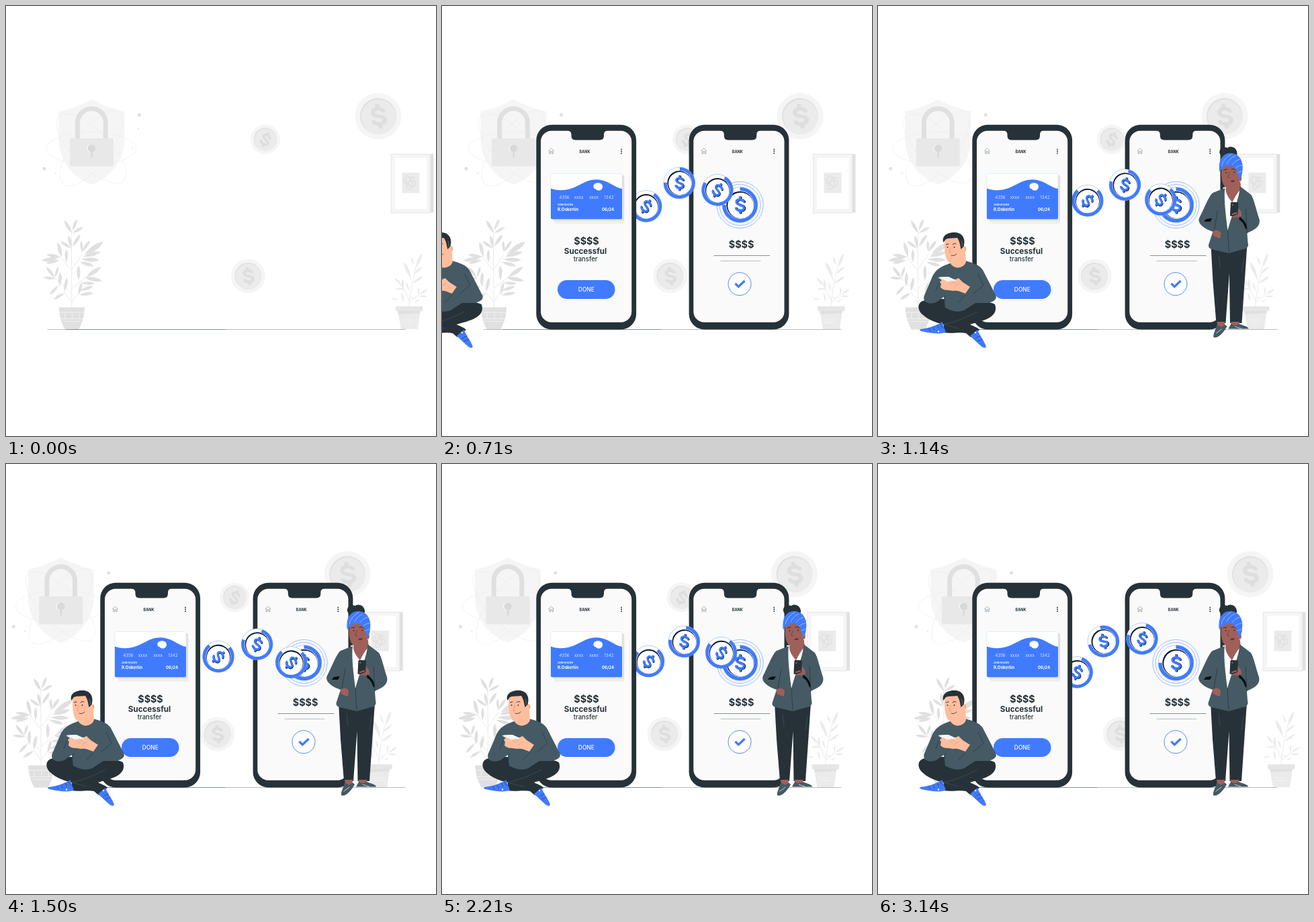
An HTML page that plays this animation: 640 by 640 pixels, repeating every 3.21 s.

```html
<!DOCTYPE html>
<html lang="en">
<head>
<meta charset="utf-8">
<title>Money transfer</title>
<style>
  html, body { margin: 0; width: 100%; height: 100%; overflow: hidden; background: #fff; }
  svg { display: block; width: 100vw; height: 100vh; }
  text { font-family: Inter, Lato, sans-serif; }
  .line { fill: none; stroke-linecap: round; stroke-linejoin: round; }
  .butt { fill: none; }
</style>
</head>
<body>
<svg id="stage" viewBox="0 0 640 640" xmlns="http://www.w3.org/2000/svg"></svg>
<script>
const BLUE = '#407bff', DARK = '#263238', SLATE = '#455a64';
const PALE = '#f5f5f5', LIGHT = '#ebebeb', GREY = '#e0e0e0';
const PEACH = '#ffbe9d', BROWN = '#9f605a';
const LOOP = 3210, STEPS = 45;

const path = (d, fill) => `<path d="${d}" fill="${fill}"/>`;
const line = (d, color, width = 1, cap = 'line') =>
  `<path class="${cap}" d="${d}" stroke="${color}" stroke-width="${width}"/>`;
const circle = (x, y, r, fill, extra = '') => `<circle cx="${x}" cy="${y}" r="${r}" fill="${fill}" ${extra}/>`;
const rect = (x, y, w, h, fill, r = 0, extra = '') =>
  `<rect x="${x}" y="${y}" width="${w}" height="${h}" rx="${r}" fill="${fill}" ${extra}/>`;
const group = (body, transform = '', id = '') => `<g id="${id}" transform="${transform}">${body}</g>`;
const label = (s, x, y, size, weight, fill = DARK, anchor = 'middle') =>
  `<text x="${x}" y="${y}" font-size="${size}" font-weight="${weight}" text-anchor="${anchor}" fill="${fill}">${s}</text>`;

// Dollar sign about 26 units high, centred on the origin
const DOLLAR = 'M5.6-5C3.5-9-5.4-9.4-5.4-4.3C-5.4 1 5.8-1 5.8 4.4C5.8 9.6-4 9.2-6 5M0-11.5V-8M0 8V11.5';
const dollar = (color, shade) =>
  group(line(DOLLAR, shade, 3.4), 'translate(1.3 .5)') + line(DOLLAR, color, 3.4);

function leaf([x1, y1, x2, y2], fill, bulge) {
  const dx = x2 - x1, dy = y2 - y1, nx = -dy * bulge, ny = dx * bulge;
  const mx = x1 + dx * .6, my = y1 + dy * .6;
  return path(`M${x1} ${y1}Q${mx + nx} ${my + ny} ${x2} ${y2}Q${mx - nx} ${my - ny} ${x1} ${y1}Z`, fill);
}

// "x y x y" pairs of base and tip
const leaves = (list, fill, bulge) =>
  list.split(',').map(s => leaf(s.trim().split(' ').map(Number), fill, bulge)).join('');

function greyCoin(x, y, r, turn) {
  return circle(x, y, r, PALE) + circle(x, y, r * .78, GREY) +
    circle(x + r * .02, y + r * .035, r * .75, LIGHT) +
    group(dollar('#dedede', GREY), `translate(${x} ${y}) rotate(${turn}) scale(${r / 24.5})`);
}

function blueCoin(x, y, scale, turn) {
  return group(
    circle(0, 0, 26.3, '#fff', `stroke="${BLUE}" stroke-width=".4"`) +
    line('M0-23.6A23.6 23.6 0 1 1-23.6 0', BLUE, 5.4, 'butt') +
    circle(0, 0, 20.2, '#0c1a33') + circle(1, .9, 19.2, '#fff') +
    dollar(BLUE, '#15264d'),
    `translate(${x} ${y}) rotate(${turn}) scale(${scale})`);
}

function shield() {
  const orbit = (rx, ry, turn) =>
    `<ellipse cx="127" cy="212" rx="${rx}" ry="${ry}" transform="rotate(${turn} 127 212)" fill="none" stroke="${LIGHT}" stroke-width=".6"/>`;
  return path('M127.5 139Q149 151 176.5 157V199C176 231 153 257 127.5 266C102 257 79 231 78.5 199V157Q106 151 127.5 139Z', PALE) +
    orbit(67, 24, 0) + orbit(68, 27, 45) + orbit(68, 27, -52) +
    line('M106.7 197V173.5a20.800 20.800 0 0 1 41.6 0V197', GREY, 7, 'butt') +
    rect(95, 197, 65, 41.5, '#e8e8e8', 2) +
    circle(126, 212, 6, PALE) + circle(127.5, 212, 5.7, '#d9d9d9') + rect(126.4, 214, 2.4, 12, '#d9d9d9', 1) +
    circle(198.5, 162, 2.5, GREY) + circle(57, 242, 2.5, GREY) +
    circle(197, 182.5, .9, GREY) + circle(74, 249, .9, GREY) + circle(188, 212, .9, GREY);
}

function picture() {
  return rect(631, 220.5, 5.5, 87, GREY) +
    rect(573.3, 220.5, 58.5, 87.5, PALE, 0, 'stroke="#e6e6e6"') +
    rect(579, 226, 47.5, 76, '#fff') + rect(589.5, 248, 26, 30.5, LIGHT) +
    line('M592 256C591 265 599 268 601 260C603 252 594 250 595 258C597 268 606 272 609 266C613 258 601 258 597 266C593 276 604 274 605 266C606 256 598 252 608 256', GREY, 1.5);
}

function largePlant() {
  return line('M98 449L97.5 335M98 395L82 374M98 392L113 370M98 420L119 404M98 441L110 424M98 427L73 405M98 441L87 426', LIGHT, 1) +
    leaves(`98 338 87 319,99 334 106 317,99 338 115 329,97 360 93 341,99 358 111 340,97 361 81 350,
      83 374 77 351,82 374 60 370,78 375 53 379,80 378 60 383,90 382 90 362,113 366 112 349,
      113 366 125 349,117 370 145 351,115 373 141 366,112 377 139 378,110 381 131 387,108 409 108 386,
      119 404 142 388,117 404 143 409,112 412 132 413,110 424 130 417,109 430 130 427,108 430 113 411,
      73 405 60 388,73 404 78 388,74 406 56 404,80 418 81 396,87 425 91 404,78 416 65 430,87 427 71 437`, GREY, .23) +
    path('M79 448.5H117C117 461 113 473 108 481.5H88C83 473 79 461 79 448.5Z', GREY) +
    line('M80 456H116M82 465.5H114M85 469.5H111M88 457V465M99 457V465M109 457V465', PALE, .8);
}

function smallPlant() {
  return line('M600 447Q602 415 613 378M601 440L590 417M602 440L614 430M603 408L595 390', LIGHT, 1) +
    leaves(`611 388 619 368,607 386 603 373,603 405 592 381,607 399 620 388,605 413 621 402,590 417 578 404,
      591 424 590 406,592 421 579 421,600 424 596 411,592 440 589 427,584 436 573 436,614 430 614 418,
      615 430 628 421,614 432 627 432,608 441 616 437,608 437 602 432`, LIGHT, .19) +
    path('M583 453H617L613 481H588Z', LIGHT) + path('M583 453.5H617L616 457L584 459Z', GREY) +
    rect(580, 447, 40.5, 7, '#e6e6e6', 1) + line('M590 467H607M591 471H606', PALE, .7);
}

function phoneBody() {
  return rect(140.3, 176.7, 148.8, 304.8, DARK, 23) + rect(147, 185.7, 135.2, 285, '#fafafa', 16) +
    path('M186 185H247Q241 186 241 191V193Q241 199.5 234.5 199.5H198.5Q192.5 199.5 192.5 193V191Q192.5 186 186 185Z', DARK) +
    label('BANK', 212.5, 219, 5.5, 700) +
    line('M158.8 215.5L162.5 211.8L166.3 215.5M159.8 215V219.8H161.5V216.5H163.7V219.8H165.4V215', '#78858b', .6) +
    [213.4, 216.3, 219.2].map(y => circle(267, y, .95, DARK)).join('');
}

function card() {
  const digits = [['4356', 182], ['xxxx', 203.5], ['xxxx', 226], ['1342', 248.5]];
  return rect(167, 254, 104.5, 70, '#efefef', 2) + rect(165, 252, 106, 67.5, GREY, 2) +
    rect(162, 249.5, 106, 67.8, '#fff', 2, 'stroke="#d7e2fb" stroke-width=".6"') +
    path('M162 271.5C174 276 188 275 203 267C219 258 231 255 246 262C256 267 261 271 268 272V315.3Q268 317.3 266 317.3H164Q162 317.3 162 315.3Z', BLUE) +
    path('M225.5 267C227 262 238 262 239 268C239.5 275.5 231 276 229 272.5C226 272 225 270 225.5 267Z', '#fff') +
    digits.map(([s, x]) => label(s, x, 287, 6.4, 300, '#fff')).join('') +
    label('CARD HOLDER', 172, 297, 3.2, 700, '#fff', 'start') +
    label('R.Oskerlin', 172, 305.2, 6.2, 700, '#fff', 'start') +
    label('06/24', 256, 305.2, 6, 700, '#fff', 'end');
}

function senderPhone() {
  return phoneBody() + card() + label('$$$$', 215, 354.5, 14.3, 700) +
    label('Successful', 213.5, 369, 11.6, 700) + label('transfer', 213.7, 379.7, 9.5, 500) +
    rect(172, 408, 85.5, 28, BLUE, 14) + label('DONE', 214.8, 424.5, 8.4, 500, '#fff');
}

function receiverPhone() {
  const ring = r => circle(443.5, 296, r, 'none', `stroke="${BLUE}" stroke-width=".5"`);
  return group(phoneBody(), 'translate(227.3 0)') + ring(34.6) + ring(30.5) + blueCoin(443.5, 296, 1, 0) +
    label('$$$$', 445.6, 360.2, 14.4, 700) +
    line('M405 371.5H488', '#6d777c', .8) + line('M415 379.5H474', '#8b9397', .6) +
    circle(443, 413.7, 17, '#fff', `stroke="${BLUE}" stroke-width=".9"`) +
    line('M436.5 413L441.3 417.8L450.5 409', BLUE, 3.3, 'butt');
}

function man() {
  const legs = path('M70 438C58 440 58 452 66 459C74 467 88 472 98 474L97 486C110 488 122 485 131 487L138 493L151 482C148 478 140 476 137 474C154 469 181 464 174 444C160 436 90 434 70 438Z', DARK) +
    line('M97 474Q122 469 148 455M98 474L120 480', '#4b5960', .6);
  const shoes = path('M62.5 481C72 480 88 476 95.5 470Q98 478 101 485C94 490 72 486 63 483.5Z', BLUE) +
    path('M137 491L148 482C151 490 159 500 161 507C160 510 156 509 152 505Z', BLUE) +
    line('M76 480L78 484M82 478L84 482M88 475L91 480M93 473L96 479M145 495L152 491M148 499L155 496', DARK, .6) +
    circle(90, 484.5, 1.2, '#fff') + circle(145, 486, 1.2, '#fff');
  const sweater = path('M107 383C92 388 84 394 80 405L68.5 432C66 441 77 446 88 440L98 433L100 449Q116 458 128 453L145 442H164C176 439 178 434 174 428L156 393C151 385 140 382 130 379Z', SLATE) +
    line('M91 411L86 424M100 431L99 440M149 399L157 416L142 428M130 430L120 441', DARK, .6);
  const head = path('M107 372L130 365L131 381C128 390 114 394 107 382Z', PEACH) +
    path('M100 345C98 356 99 372 103 379C107 386 122 383 125 372L126 367C132 368 134 357 128 357L126 343C115 339 105 340 100 345Z', PEACH) +
    path('M97.500 352C94 343 103 336.500 114 337C126 337 131 347 127.500 358L123.500 362C122 356 122 351 118 345C111 346 105 345 101 347Z', DARK) +
    line('M124 350Q126 353 125 358', '#58646a', 1.2) +
    line('M108 359L106 367L109 367.5M129 360Q131 359 130 363', '#e58d70', .8) + line('M109 371Q113 373 117 369', DARK, .8) +
    line('M101.5 355L105 354M111 355Q113 352 116 354', DARK, 1) + circle(103.5, 359, .9, DARK) + circle(113.5, 359, .9, DARK);
  const hands = path('M94 413C96 408 104 406 113 408L120 405L126 411L137 418L130 428C121 424 117 423 111 424C106 422 99 425 93 419Z', PEACH) +
    path('M89 404L104 403L117 409L101 412Z', '#d8dde0') + path('M91 403.5L105 403L116 408L102 410.5Z', '#f4f6f7') +
    path('M92 411Q95 406 99 408L104 411Q98 412 96 416Z', PEACH) +
    line('M104 410L110 415M108 409L114 413M121 413L113 418', '#e58d70', .6);
  return legs + shoes + sweater + head + hands;
}

function woman() {
  const legs = path('M495 355L498 410L503 472H517L522.500 398L523.500 472H541L549 355Z', DARK) +
    line('M507 372L509 390M544 376L541 395', '#4b5960', .6) +
    path('M504 470H516L515 478H505ZM525 470H537V477H525Z', BROWN) +
    path('M504 474C502 483 498 488 499 493C505 496 514 486 519 477L516 474L511 478Z', SLATE) +
    path('M525 473L521 480.5H551C551 477 544 476 537 473Q531 477 525 473Z', SLATE) +
    line('M503 487L511 481M531 477L540 480', '#fff', .7);
  const jacket = path('M513 270L538 268V337H514Z', '#fff') +
    path('M519 258L538 256L540 272C534 278 530 286 527 292C521 286 517 278 517 273Z', BROWN) +
    path('M516 271L498 278C492 282 484 304 478 315C474 323 484 330 493 334L498 336L492 354Q490 360 496 362L522 368L547 361Q552 358 550 352L549 338C558 334 570 329 567 317C562 302 559 287 555 281L538 268C538 285 531 296 520 334C517 310 514 286 516 271Z', SLATE) +
    line('M520 334L522 366M500 334L505 305M549 338L547 302', DARK, .7) +
    path('M485 321C488 315 492 317 497 316L494 321ZM538 313C541 317 550 322 548 333C544 329 546 323 537 318Z', '#080d10');
  const hands = path('M498 337C500 332 508 333 510 338L509 346C505 345 500 343 498 341Z', BROWN) +
    path('M526 304L535 300L540 306L541 313L533 315L525 310Z', BROWN) +
    rect(524, 292, 11.5, 21, DARK, 1.5, 'transform="rotate(3 530 302)"') + circle(527.5, 296, 1.2, '#61717a') +
    line('M527 310L533 308M528 314L535 311', BROWN, 2.2);
  const head = path('M511 241C510 254 511 264 516 269C522 273 531 266 535 263C541 264 543 253 538 251L537 236Q524 228 511 241Z', BROWN) +
    path('M508 219C507 211 514 209 520 211C526 207 535 212 534 221L526 227H512Z', DARK) +
    path('M508 247C505 229 513 219 524 219C537 219 544 231 542 244C542 251 540 256 537 258C536 249 533 243 527 238C519 237 512 240 508 247Z', BLUE) +
    line('M511 238Q514 226 525 221M519 235Q522 227 531 223M527 236Q531 230 538 228M532 241Q536 237 541 237M535 248L541 246', '#b9cfff', .7) +
    line('M514 244L519 243M526 243Q529 241 532 244', DARK, 1) + circle(517.5, 248, .9, DARK) + circle(530, 247.5, .9, DARK) +
    line('M522 248L520 255L523 256', '#6e3e38', .8) + path('M524 261Q527 258 531 260Q528 264 524 261Z', '#6b3038') +
    circle(538.5, 261, .8, '#fff');
  return legs + jacket + hands + head;
}

const stage = document.getElementById('stage');
stage.innerHTML =
  group(shield() + greyCoin(554, 164, 34.5, -9) + greyCoin(386, 198.5, 22, 24) + greyCoin(360.5, 402, 25.5, -8) +
    picture() + largePlant() + smallPlant(), '', 'backdrop') +
  line('M62 481.5H594', '#a5abae', .8) + line('M90 481.5H326', '#737d82', .7) +
  group(blueCoin(296.3, 310, .89, 19), '', 'coinBehind') +
  group(senderPhone(), '', 'sender') + group(receiverPhone(), '', 'receiver') +
  group(blueCoin(335.5, 264, .89, -13) + blueCoin(393, 260, .89, 16), '', 'coinsFront') +
  group(man(), '', 'man') + group(woman(), '', 'woman');

const parts = {};
for (const id of ['backdrop', 'coinBehind', 'sender', 'receiver', 'coinsFront', 'man', 'woman'])
  parts[id] = document.getElementById(id);

const ease = u => { u = Math.min(1, Math.max(0, u)); return u * u * (3 - 2 * u); };
const move = (id, transform) => parts[id].setAttribute('transform', transform);
const grow = (id, x, s) => move(id, `translate(${x} 481.5) scale(${s}) translate(${-x} -481.5)`);

function render(ms) {
  const step = Math.floor((ms + 4) * STEPS / LOOP) % STEPS;
  const sway = ease(1 - Math.abs(1 - 2 * (step + .6) / STEPS));
  move('backdrop', `translate(${-46 * sway} 0)`);
  for (const id of ['coinBehind', 'coinsFront']) {
    move(id, `rotate(${32 * sway} 347 333)`);
    parts[id].setAttribute('opacity', ease(step / 4));
  }
  grow('sender', 214.7, ease(step / 6.7));
  grow('receiver', 442, ease((step - .7) / 6.7));
  move('man', `translate(${-190 * (1 - ease((step - 7) / 7))} 0)`);
  move('woman', `translate(${170 * (1 - ease((step - 9.5) / 6.7))} 0)`);
}

const start = performance.now();
function tick() {
  render((performance.now() - start) % LOOP);
  requestAnimationFrame(tick);
}
tick();
</script>
</body>
</html>
```
